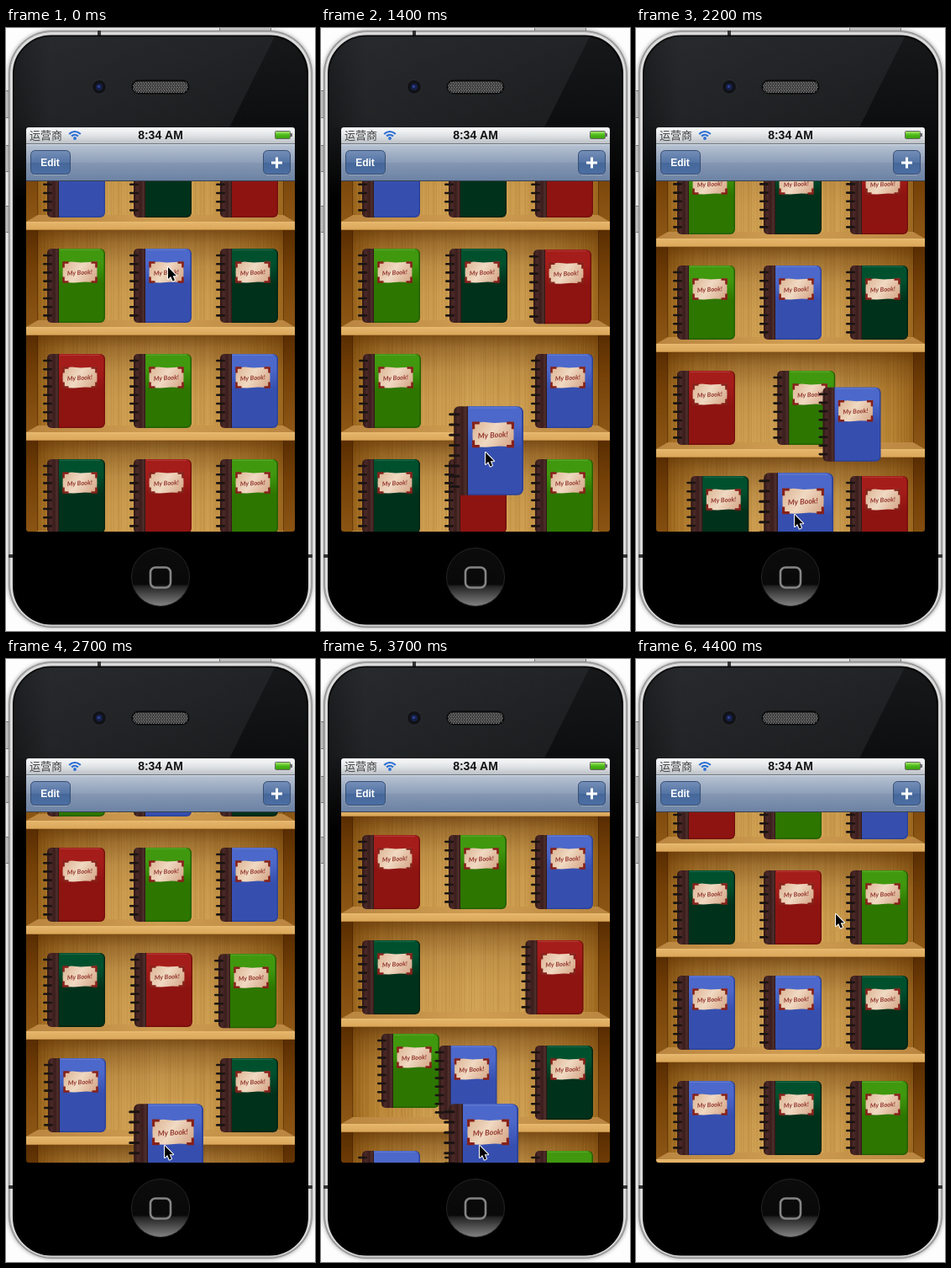
An HTML page with a canvas that plays this animation: 368 px wide and 716 px high, repeating every 4.5 s.

```html
<!DOCTYPE html>
<html lang="en">
<head>
<meta charset="utf-8">
<title>Bookshelf</title>
<style>
html, body { margin: 0; width: 100%; height: 100%; overflow: hidden; background: #fdfdfd; }
canvas { display: block; }
</style>
</head>
<body>
<canvas id="stage" width="368" height="716"></canvas>
<script>
const LOOP = 4500, STEP = 100, SHIFT = 300;
const COLS = 3, COL_W = 103, ROW_H = 125, LEFT = 48, TOP = 137;
const BOOK_W = 70, BOOK_H = 88, HOME = 4, LIFT = 1.2, DROP_AT = 4050;
const CYCLE = 'BDRG', COUNT = 32, TAIL = 'BDG';
// top, body, edge
const COVERS = {
  B: ['#4c68ca', '#364faf', '#2c429a'],
  D: ['#00502e', '#00311b', '#002413'],
  R: ['#a51d1a', '#8e1411', '#760e0c'],
  G: ['#40980f', '#2d7600', '#236000']
};
// [time, x, y]
const POINTER = [[0, 193, 284], [300, 193, 284], [1400, 196, 504], [1900, 189, 578],
  [3850, 189, 578], [DROP_AT, 192, 425], [4400, 238, 303]];
const DRAG = [[300, 196, 282], [1400, 199, 502], [1900, 193, 581],
  [3850, 193, 581], [DROP_AT, 196, 428]];
const SCROLL = [[1900, 0], [2200, 105], [2700, 288], [3200, 545], [3700, 803], [3860, 886]];
// [time, slot kept free for the dragged book]
const GAPS = [[-SHIFT, HOME], [1119, 7], [1690, 10], [1978, 13], [2419, 16],
  [2723, 19], [3026, 22], [3331, 25], [3635, 28]];
const LAST_GAP = GAPS[GAPS.length - 1][1];
const SANS = '"Liberation Sans",Arial,sans-serif';

const c = document.getElementById('stage').getContext('2d');
const clamp = u => Math.min(1, Math.max(0, u));
const ease = u => 0.5 - 0.5 * Math.cos(Math.PI * clamp(u));
const mix = (a, b, u) => a + (b - a) * u;

function along(keys, t, i) {
  if (t <= keys[0][0]) return keys[0][i];
  for (let n = 1; n < keys.length; n++) {
    const a = keys[n - 1], b = keys[n];
    if (t < b[0]) return mix(a[i], b[i], (t - a[0]) / (b[0] - a[0]));
  }
  return keys[keys.length - 1][i];
}
const pointOn = (keys, t) => [along(keys, t, 1), along(keys, t, 2)];
const between = (a, b, u) => [mix(a[0], b[0], u), mix(a[1], b[1], u)];

// stops: pairs of offset and colour
function grad(g, x0, y0, x1, y1, ...stops) {
  const f = g.createLinearGradient(x0, y0, x1, y1);
  for (let i = 0; i < stops.length; i += 2) f.addColorStop(stops[i], stops[i + 1]);
  return f;
}
function rect(g, x, y, w, h, fill) { g.fillStyle = fill; g.fillRect(x, y, w, h); }
function paint(g, fill, stroke, line) {
  if (fill) { g.fillStyle = fill; g.fill(); }
  if (stroke) { g.strokeStyle = stroke; g.lineWidth = line; g.stroke(); }
}
function round(g, x, y, w, h, r, fill, stroke, line = 1) {
  g.beginPath();
  g.roundRect(x, y, w, h, r);
  paint(g, fill, stroke, line);
}
function poly(g, points, fill, stroke, line = 1) {
  g.beginPath();
  for (let i = 0; i < points.length; i += 2) g.lineTo(points[i], points[i + 1]);
  g.closePath();
  paint(g, fill, stroke, line);
}
function disc(g, x, y, r, fill, stroke, line = 1) {
  g.beginPath();
  g.arc(x, y, r, 0, Math.PI * 2);
  paint(g, fill, stroke, line);
}
function label(g, str, x, y, font, fill, align = 'center') {
  g.font = font;
  g.fillStyle = fill;
  g.textAlign = align;
  g.fillText(str, x, y);
}
function layer(w, h, draw) {
  const cv = document.createElement('canvas');
  cv.width = w;
  cv.height = h;
  draw(cv.getContext('2d'));
  return cv;
}

function drawShelf(g) {
  let seed = 7;
  const rnd = () => (seed = seed * 16807 % 2147483647) / 2147483647;
  rect(g, 0, 0, 320, 125, grad(g, 14, 0, 306, 0, 0, '#99631a', 0.1, '#b98535',
    0.3, '#cb9b4d', 0.5, '#d0a153', 0.7, '#cb9b4d', 0.9, '#b98535', 1, '#99631a'));
  for (let x = 14; x < 306; x++) {
    rect(g, x, 0, 1, 107, `rgba(${rnd() < 0.5 ? '95,50,0' : '255,220,140'},${rnd() * 0.09})`);
  }
  rect(g, 14, 0, 292, 107, grad(g, 0, 0, 0, 107, 0, 'rgba(88,44,0,.68)', 0.15, 'rgba(88,44,0,.4)',
    0.4, 'rgba(88,44,0,.14)', 0.7, 'rgba(88,44,0,.03)', 1, 'rgba(88,44,0,0)'));
  const side = grad(g, 0, 0, 0, 115, 0, '#592d02', 0.4, '#744007', 1, '#8d5715');
  rect(g, 0, 0, 14, 116, side);
  rect(g, 306, 0, 14, 116, side);
  rect(g, 13, 0, 1, 107, 'rgba(50,20,0,.35)');
  rect(g, 306, 0, 1, 107, 'rgba(50,20,0,.35)');
  poly(g, [14, 107, 306, 107, 320, 115, 0, 115],
    grad(g, 0, 0, 320, 0, 0, '#b98540', 0.5, '#cf9d52', 1, '#b98540'));
  rect(g, 0, 115, 320, 10, grad(g, 0, 115, 0, 125, 0, '#e9bd74', 0.2, '#e3b368', 0.85, '#dca95c', 1, '#a8742f'));
}

function drawPhone(g) {
  rect(g, 0, 0, 368, 716, '#fdfdfd');
  round(g, 254.5, -2, 61, 7, 2, '#d8d8d8', '#888');
  for (const [y, h] of [[74, 32], [139, 31], [211, 31]]) round(g, -2, y + 0.5, 7, h, 2, '#cfcfcf', '#888');
  g.save();
  g.shadowColor = 'rgba(0,0,0,.4)';
  g.shadowBlur = 5;
  round(g, 3, 3, 362, 709, 52, '#8f8f8f');
  g.restore();
  round(g, 4.5, 4.5, 359, 706, 50, '#cbcbcb', '#a9a9a9');
  round(g, 6.5, 6.5, 355, 702, 48, null, '#dedede', 2);
  rect(g, 109, 3, 4, 7, '#333');
  rect(g, 3, 625, 6, 4, '#333');
  rect(g, 359, 625, 6, 4, '#333');
  g.save();
  round(g, 9, 9.5, 350, 698, 45, grad(g, 0, 10, 0, 200, 0, '#17181a', 0.5, '#0e0f10', 1, '#000'), '#050505', 2);
  g.clip();
  poly(g, [9, 10, 320, 10, 266, 118, 9, 118],
    grad(g, 9, 0, 300, 0, 0, 'rgba(62,66,70,.2)', 0.15, 'rgba(62,66,70,.42)', 1, 'rgba(62,66,70,.28)'));
  rect(g, 9, 118, 15, 90, grad(g, 0, 118, 0, 208, 0, 'rgba(62,66,70,.2)', 1, 'rgba(62,66,70,0)'));
  g.restore();

  disc(g, 111, 70, 8.5, '#111216', '#2c2e33');
  disc(g, 111, 70, 4, '#17204a');
  disc(g, 110.5, 69.5, 1.6, '#2f459a');
  round(g, 150.5, 62.5, 67, 15, 7.5, '#3c3c3c', '#0a0a0a', 2);
  g.save();
  g.clip();
  for (let y = 64; y < 78; y += 2) {
    for (let x = 151 + y / 2 % 2; x < 218; x += 3) rect(g, x, y, 1.5, 1, '#808080');
  }
  g.restore();

  disc(g, 184, 652, 34.5, grad(g, 0, 617, 0, 687, 0, '#0c0c0c', 0.62, '#090909',
    0.66, '#242424', 1, '#858585'), '#242424');
  round(g, 172, 640.5, 24, 24, 6, null, '#858585', 2.6);
}

function drawButton(g, x, w) {
  round(g, x + 0.5, 145.5, w - 1, 28, 5, grad(g, 0, 145, 0, 174, 0, '#7690b8', 0.5, '#5474a5',
    0.52, '#456799', 1, '#4c6fa4'), '#384f72');
  rect(g, x + 4, 174, w - 8, 1, 'rgba(255,255,255,.25)');
}

function drawBars(g) {
  round(g, 24, 118, 320, 21, [3, 3, 0, 0], grad(g, 0, 118, 0, 138, 0, '#fafbfb', 0.5, '#dfe2e4', 1, '#b9bec4'));
  rect(g, 24, 137, 320, 1, '#6f7680');
  label(g, '运营商', 28, 132, '13px "Noto Sans CJK SC","Noto Sans CJK",sans-serif', '#444', 'left');
  g.strokeStyle = '#2c6fd3';
  g.lineWidth = 2.2;
  for (const r of [5.2, 9]) {
    g.beginPath();
    g.arc(82, 132, r, -Math.PI * 0.77, -Math.PI * 0.23);
    g.stroke();
  }
  disc(g, 82, 131, 1.9, '#2c6fd3');
  label(g, '8:34 AM', 184, 132, `bold 14px ${SANS}`, '#111');
  round(g, 320.5, 122.5, 18, 9, 1, '#eee', '#666');
  rect(g, 321, 123, 17, 8, grad(g, 0, 123, 0, 131, 0, '#a4e56c', 0.5, '#4cbb17', 1, '#3da010'));
  rect(g, 339, 125, 2, 4, '#666');

  rect(g, 24, 138, 320, 43, grad(g, 0, 138, 0, 181, 0, '#b9c4d3', 0.5, '#8e9fb9', 0.52, '#8496b2', 1, '#6d83a4'));
  rect(g, 24, 138, 320, 1, '#d3dbe5');
  rect(g, 24, 181, 320, 1, '#38414f');
  drawButton(g, 29, 48);
  drawButton(g, 306, 33);
  label(g, 'Edit', 52.5, 164, `bold 12px ${SANS}`, '#fff');
  rect(g, 316, 158.5, 13, 3, '#fff');
  rect(g, 321, 153.5, 3, 13, '#fff');
}

// Four brackets around a box
function drawCorners(x0, y0, x1, y1, arm) {
  c.beginPath();
  for (const [x, dx] of [[x0, arm], [x1, -arm]]) {
    for (const [y, dy] of [[y0, arm], [y1, -arm]]) {
      c.moveTo(x + dx, y);
      c.lineTo(x, y);
      c.lineTo(x, y + dy);
    }
  }
  paint(c, null, '#86211a', 2.6);
}

// Centred on x, y
function drawBook(kind, x, y, scale) {
  const [top, body, edge] = COVERS[kind];
  c.save();
  c.translate(x, y);
  c.scale(scale, scale);
  c.translate(-BOOK_W / 2, -BOOK_H / 2);
  round(c, 14, 0, 56, 88, [0, 6, 6, 0], edge);
  round(c, 14, 0, 54.5, 86.5, [0, 6, 5, 0],
    grad(c, 0, 0, 0, 87, 0, top, 0.2, top, 0.48, body, 1, body));
  rect(c, 16, 1, 48, 1, 'rgba(255,255,255,.12)');
  round(c, 1, 0, 14, 88, [5, 0, 0, 5], grad(c, 1, 0, 15, 0, 0, '#2e1615', 0.3, '#4b2a28',
    0.6, '#3a1d1c', 0.85, '#50302d', 1, '#2c1312'));
  for (let i = 0; i < 8; i++) {
    const ry = 8 + i * 10.2;
    round(c, -4, ry - 1.3, 11, 2.6, 1.3, '#1b1412');
  }

  poly(c, [20, 17, 30, 15.5, 41, 16.5, 60, 15.5, 60.5, 28, 60, 40, 46, 39.5, 33, 40.5, 20, 40, 19.5, 28],
    grad(c, 20, 16, 60, 41, 0, '#dcb494', 0.45, '#f0d9c2', 1, '#d3a283'));
  drawCorners(20.5, 16.5, 59.5, 39.5, 6);
  c.translate(40, 31);
  c.rotate(-0.06);
  label(c, 'My Book!', 0, 0, 'italic bold 7.5px Lato,"Open Sans",sans-serif', '#94382f');
  c.restore();
}

function drawPointer(x, y) {
  c.save();
  c.translate(x, y);
  c.lineJoin = 'round';
  const arrow = [0, 0, 0, 14, 3.2, 11, 5.6, 16.5, 8, 15.4, 5.7, 10.2, 10, 10.2];
  poly(c, arrow, null, '#fff', 2);
  poly(c, arrow, '#000');
  c.restore();
}

const shelf = layer(320, ROW_H, drawShelf);
const frame = layer(368, 716, g => { drawPhone(g); drawBars(g); });

// Books left on the shelf while one is dragged
const books = Array.from({ length: COUNT }, (_, k) =>
  k < COUNT - TAIL.length ? CYCLE[(k < HOME ? k : k + 1) % 4] : TAIL[k - COUNT + TAIL.length]);

function slotCentre(slot, scroll) {
  return [LEFT + COL_W * (slot % COLS) + BOOK_W / 2,
    TOP + ROW_H * Math.floor(slot / COLS) - scroll + BOOK_H / 2];
}

function drawDragged(t, scroll) {
  const lift = ease(t / 200), drop = ease((t - DROP_AT) / 250);
  let at = between(slotCentre(HOME, scroll), pointOn(DRAG, t), lift);
  at = between(at, slotCentre(LAST_GAP, scroll), drop);
  drawBook('B', ...at, mix(1, LIFT, lift * (1 - drop)));
}

function render(t) {
  const scroll = along(SCROLL, t, 1);
  c.drawImage(frame, 0, 0);
  c.save();
  c.beginPath();
  c.roundRect(24, 182, 320, 416, [0, 0, 3, 3]);
  c.clip();
  for (let row = -1; row < 12; row++) {
    const y = TOP - 22 + row * ROW_H - scroll;
    if (y > 50 && y < 600) c.drawImage(shelf, 24, Math.round(y));
  }

  let n = 0;
  while (n + 1 < GAPS.length && GAPS[n + 1][0] <= t) n++;
  const gap = GAPS[n][1], before = GAPS[Math.max(0, n - 1)][1];
  const u = ease((t - GAPS[n][0]) / SHIFT);
  books.forEach((kind, k) => {
    const from = slotCentre(k < before ? k : k + 1, scroll);
    const to = slotCentre(k < gap ? k : k + 1, scroll);
    const [x, y] = between(from, to, u);
    if (y > 120 && y < 660) drawBook(kind, x, y, 1);
  });
  drawDragged(t, scroll);
  c.restore();
  drawPointer(...pointOn(POINTER, t));
}

const start = performance.now();
let shown = -1;
function tick() {
  const t = Math.floor((performance.now() - start) % LOOP / STEP) * STEP;
  if (t !== shown) render(shown = t);
  requestAnimationFrame(tick);
}
tick();
</script>
</body>
</html>
```
